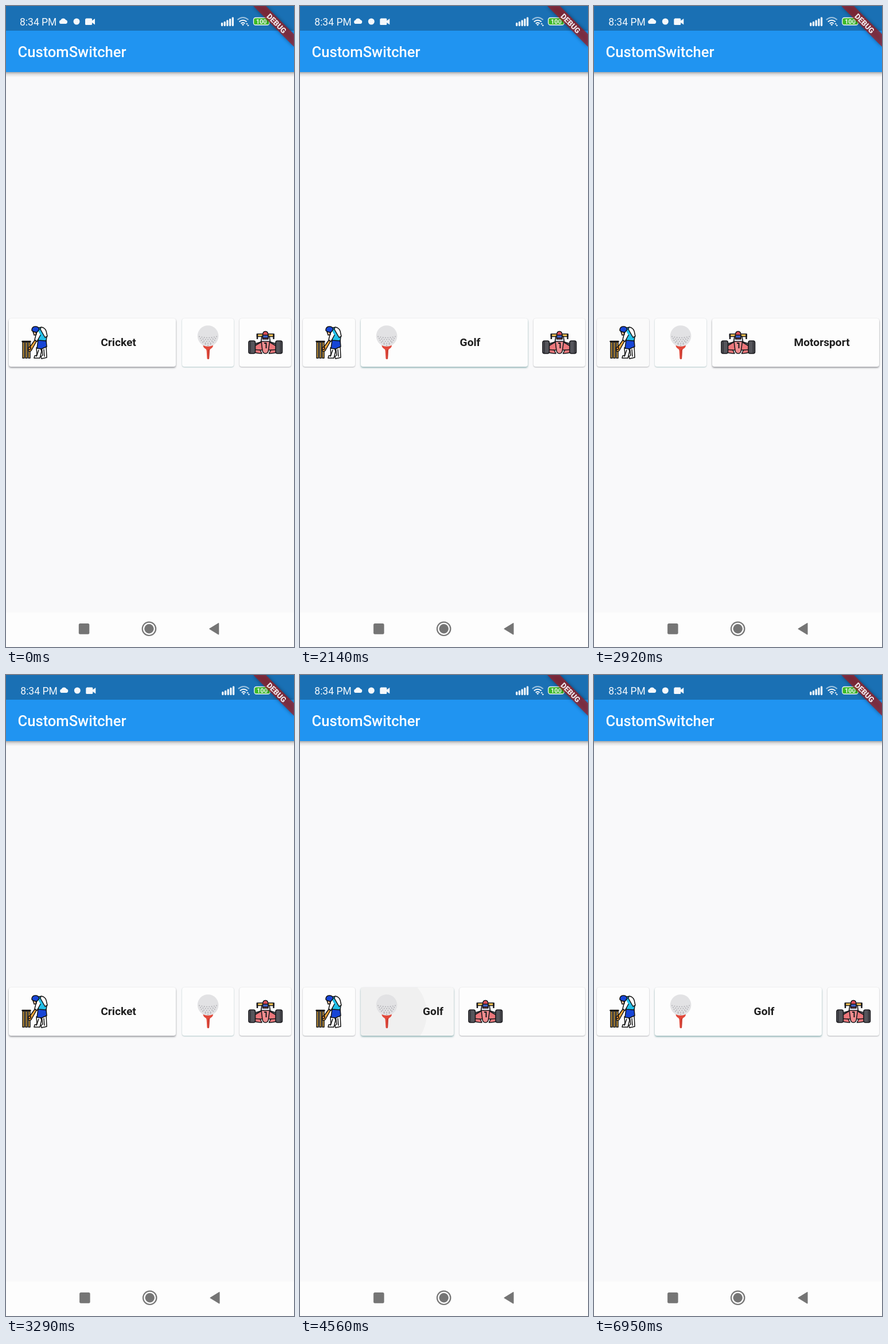
Animation, 502 px wide and 1116 px high, one loop 7000 ms. Source, as an HTML page:

```html
<!DOCTYPE html>
<html lang="en">
<head>
<meta charset="utf-8">
<title>CustomSwitcher</title>
<style>
  html, body { margin: 0; width: 100%; height: 100%; overflow: hidden; background: #f9f9fa; }
  body { position: relative; font-family: Roboto, sans-serif; }
  #chrome { position: absolute; left: 0; top: 0; }
  .card {
    position: absolute; top: 543.5px; height: 84px; overflow: hidden;
    border-radius: 4px; background: #fdfdfd;
  }
  .card svg { position: absolute; left: 0; top: 0; }
  .ripple { position: absolute; border-radius: 50%; background: #000; }
  .press { position: absolute; inset: 0; background: #000; }
  .label {
    position: absolute; left: 90.3px; right: 0; top: 0; bottom: 0; overflow: hidden;
    display: flex; align-items: center; justify-content: center;
    font-size: 19.2px; font-weight: 700; color: #1d1d1d; white-space: nowrap;
  }
</style>
</head>
<body>
<svg id="chrome" width="502" height="1116" viewBox="0 0 502 1116">
  <defs>
    <linearGradient id="drop" x2="0" y2="1">
      <stop offset="0" stop-color="#000" stop-opacity=".32"/>
      <stop offset=".45" stop-color="#000" stop-opacity=".1"/>
      <stop offset="1" stop-color="#000" stop-opacity="0"/>
    </linearGradient>
    <filter id="blur" x="-20%" y="-20%" width="140%" height="140%"><feGaussianBlur stdDeviation="3"/></filter>
  </defs>
  <rect y="115" width="502" height="9" fill="url(#drop)"/>
  <rect width="502" height="115" fill="#2094f1"/>
  <rect width="502" height="43" fill="#1a70b4"/>
  <text x="20.5" y="89" font-size="25.6" font-weight="500" fill="#fff">CustomSwitcher</text>

  <g class="drift" fill="#f4f8fb">
    <text x="24" y="33.5" font-size="17.5">8:34 PM</text>
    <path d="M95 31a3.4 3.4 0 0 1 .3-6.5a5 5 0 0 1 9-.3a3.5 3.5 0 0 1 .2 6.8z"/>
    <circle cx="123" cy="27" r="5.5"/>
    <path d="M139.500 21.500h9q1.500 0 1.500 1.500v2.500l5-3.500v10.500l-5-3.500v2.500q0 1.500-1.500 1.500h-9q-1.500 0-1.500-1.500v-8q0-1.500 1.500-1.500z"/>
    <path d="M376.500 33.500v-3M381.200 33.500v-5M385.900 33.500v-7.500M390.600 33.500v-10M395.300 33.500v-12.500" stroke="#f4f8fb" stroke-width="3.300" stroke-linecap="round"/>
    <g fill="none" stroke="#f4f8fb" stroke-width="2">
      <path d="M403.500 24q9.500-8 19 0" opacity=".6"/>
      <path d="M406.500 27.500q6.500-5.500 13 0"/>
      <path d="M409.500 30.500q3.500-3 7 0"/>
    </g>
    <path d="M410.500 31.500h5l-2.500 3zM418 32l2-2.500l2 2.500zM420 33h4l-2 2.500z"/>
    <rect x="431.500" y="20.500" width="27.500" height="12.500" rx="3.500" fill="#3cb927" stroke="#f4f8fb" stroke-width="1.300"/>
    <text x="445.200" y="30.800" font-size="11" font-weight="700" text-anchor="middle">100</text>
    <path d="M461 24.500q2 2.200 0 4.500zM469 21l-5 7h4l-1.500 5l6.500-7.500h-4l1.500-4.500z"/>
  </g>

  <path d="M431 0h22L502 49v22z" filter="url(#blur)" opacity=".4"/>
  <path d="M431 0h22L502 49v22z" fill="#a11c22" fill-opacity=".72"/>
  <text transform="translate(471.500 30.500) rotate(45)" y="4.500" font-size="13.200" font-weight="900" text-anchor="middle" fill="#efe6ea">DEBUG</text>

  <rect y="1056" width="502" height="60" fill="#fdfdfd"/>
  <g class="drift" fill="#757575">
    <rect x="126.800" y="1075" width="18.500" height="18.800" rx="2.500"/>
    <circle cx="249.400" cy="1084.300" r="8.200"/>
    <circle cx="249.400" cy="1084.300" r="11.700" fill="none" stroke="#757575" stroke-width="2.200"/>
    <path d="M355 1084.300L370.500 1074.800v19z" stroke="#757575" stroke-width="1.500" stroke-linejoin="round"/>
  </g>
</svg>

<script>
const COLLAPSED = 90.3, EXPANDED = 291.2, GAP = 10.2, LEFT = 5.3;
const LOOP = 7000, SLIDE = 300, DRIFT_AT = 1900;

const cricket = `
  <g stroke="#111" stroke-width="1.500" stroke-linejoin="round" stroke-linecap="round">
    <path d="M24 41h3v28h-3zM29 41h3v28h-3zM34 41h3v28h-3z" fill="#e9b044"/>
    <path d="M23.500 40h14" stroke-width="2.500"/>
    <path d="M45 38l3 2l-9 16q-3 3-5 0q-1-2 1-4z" fill="#f6a83c"/>
    <path d="M48 51l6-2l3 8l-3 12h-10l1-4l4-1z" fill="#fff"/>
    <path d="M57 50l8-2l1 20l-9 2l-1-4l3-2z" fill="#fff"/>
    <path d="M51 37l14 1l1 11l-9 4l-8-1z" fill="#1745d6"/>
    <path d="M49 18q5-4 9-1l8 15l-1 7l-14-1q2-11-2-20z" fill="#22bfe8"/>
    <path d="M56 15q7 1 9 7l2 9l-4 2l-8-14z" fill="#fff"/>
    <path d="M50 20l-3 9l-2 8l4 3l6-11" fill="#fff"/>
    <path d="M40 21q0-7 6-7q6 0 7 5l-4 5q-5 1-9-3z" fill="#1745d6"/>
    <path d="M42 23l5 1l1 4l-4 1z" fill="#f3c9a5"/>
    <circle cx="36" cy="52" r="2.300" fill="#e98b30"/>
    <path d="M52 55l-4 11M61 54l1 12" fill="none"/>
  </g>`;

function golf() {
  let dimples = '';
  for (let row = 0; row < 5; row++) {
    const half = [15, 13, 11.5, 9, 4.5][row], count = [8, 7, 6, 5, 3][row];
    for (let i = 0; i < count; i++) {
      const u = i / (count - 1) * 2 - 1;
      dimples += `<circle cx="${45.1 + u * half}" cy="${33.5 + row * 3.3 - u * u * 2}" r="1.05"/>`;
    }
  }
  return `
    <path d="M36.500 46.500h17.500q0 4-4.500 6.500q-1.500 1-1.700 4l-.7 13q-1.800 2-3.600 0l-.8-13q0-3-1.700-4q-4.500-2.500-4.500-6.500z" fill="#e2493b"/>
    <path d="M45.500 54h2.300l-.8 16l-1.500 1z" fill="#c63c32"/>
    <circle cx="45.100" cy="30.500" r="18.300" fill="#e2e2e4"/>
    <g fill="#b3b3b8">${dimples}</g>`;
}

const car = `
  <g stroke="#18181c" stroke-width="1.600" stroke-linejoin="round">
    <path d="M24 45L37 41h17l13 4v4H24z" fill="#77777d"/>
    <rect x="30.500" y="27" width="29.500" height="4.500" fill="#f5c451"/>
    <path d="M31 27v9M59.500 27v9" stroke-width="2.500"/>
    <path d="M39 31h13l2 12H37z" fill="#e8eaf2"/>
    <path d="M40.500 29q0-6.500 4.700-6.500t4.700 6.500v7h-9.400z" fill="#dd4d55"/>
    <path d="M40.500 29h9.400v5h-9.400z" fill="#3f62c6"/>
    <path d="M26 48l12-7h14l12 7l1 7H25z" fill="#ec777b"/>
    <path d="M23 54l13 1l3 6q-9 0-16-3zM67.500 54l-13 1l-3 6q9 0 16-3z" fill="#ec777b"/>
    <path d="M38 40h14.500l-2 15q-.5 6-5.300 6t-5.300-6z" fill="#f08c8e"/>
    <path d="M43 43h3.500v9" fill="none" stroke-width="2"/>
    <rect x="16" y="39" width="11.500" height="22" rx="3" fill="#55555b"/>
    <rect x="63" y="39" width="11.500" height="22" rx="3" fill="#55555b"/>
    <path d="M19 40v20M71.500 40v20" stroke="#36363b" stroke-width="2"/>
  </g>`;

const cards = [
  { name: 'Cricket', icon: cricket, shade: '30,35,45' },
  { name: 'Golf', icon: golf(), shade: '20,95,100' },
  { name: 'Motorsport', icon: car, shade: '30,35,45' },
].map(card => {
  const el = document.createElement('div');
  el.className = 'card';
  el.innerHTML = `<div class="press"></div><div class="ripple"></div>
    <svg width="90" height="84">${card.icon}</svg><div class="label">${card.name}</div>`;
  document.body.append(el);
  const part = name => el.querySelector('.' + name);
  return { ...card, el, press: part('press'), ripple: part('ripple'), label: part('label') };
});

const taps = [
  { down: 1520, select: 1780, card: 1 },
  { down: 2260, select: 2340, card: 2 },
  { down: 2920, select: 2980, card: 0 },
  { down: 3700, select: 3760, card: 2 },
  { down: 4440, select: 4440, card: 1 },
];

const clamp = x => Math.max(0, Math.min(1, x));
const ease = x => x * x * (3 - 2 * x);

function drawRipple(card, tap, time) {
  const age = tap && tap.card === cards.indexOf(card) ? time - tap.down : -1;
  const fade = age < 0 ? 0 : 1 - clamp((time - tap.select - 120) / 200);
  const radius = Math.min(240, 0.58 * Math.max(0, age));
  card.press.style.opacity = fade * (0.012 + 0.013 * clamp(age / 120));
  Object.assign(card.ripple.style, {
    left: 45.1 - radius + 'px', top: 46 - radius + 'px',
    width: 2 * radius + 'px', height: 2 * radius + 'px', opacity: 0.028 * fade,
  });
}

function draw(time) {
  let selected = 0, previous = 0, progress = 1;
  for (const tap of taps) {
    if (time < tap.select) break;
    previous = selected;
    selected = tap.card;
    progress = ease(clamp((time - tap.select) / SLIDE));
  }
  const activeTap = taps.filter(tap => time >= tap.down).pop();

  let x = LEFT;
  cards.forEach((card, i) => {
    const open = i === selected ? progress : i === previous ? 1 - progress : 0;
    const width = COLLAPSED + (EXPANDED - COLLAPSED) * open;
    card.el.style.left = x + 'px';
    card.el.style.width = width + 'px';
    const lift = i === selected ? 1 : 0;
    card.el.style.boxShadow =
      `0 ${1 + lift}px ${2 + lift}px rgba(${card.shade},${0.3 + 0.12 * lift}), 0 0 2px rgba(0,0,0,.08)`;
    card.label.style.visibility = lift ? 'visible' : 'hidden';
    drawRipple(card, activeTap, time);
    x += width + GAP;
  });

  const shift = time < DRIFT_AT ? 0 : 1.3;
  document.querySelectorAll('.drift').forEach(g => g.setAttribute('transform', `translate(${shift} 0)`));
}

const start = performance.now();
function tick() {
  draw((performance.now() - start) % LOOP);
  requestAnimationFrame(tick);
}
tick();
</script>
</body>
</html>
```
